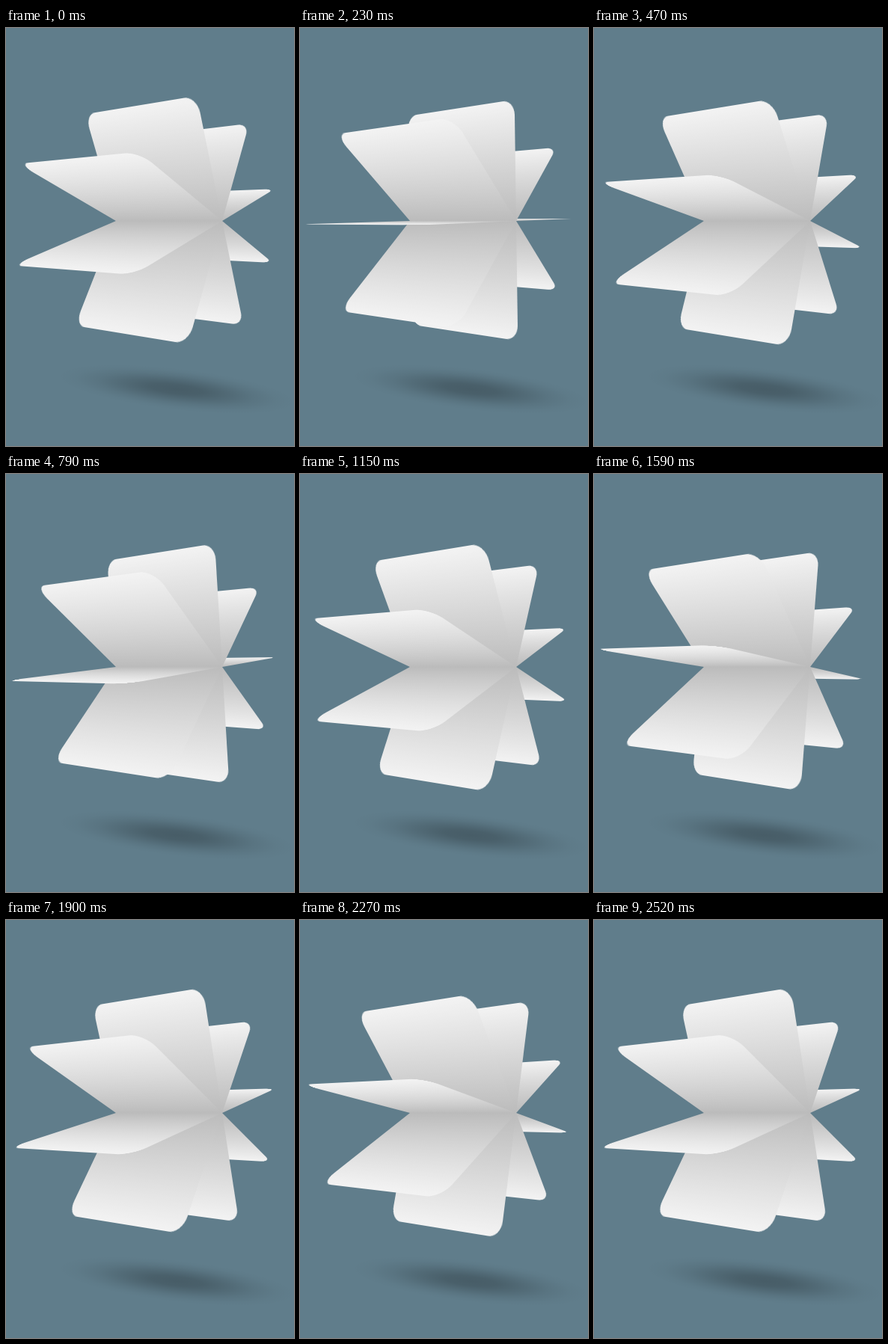
Recreate the animation shown at these times as an HTML page. Size 385 by 559 pixels, loop 2580 ms.

```html
<!DOCTYPE html>
<html lang="en">
<head>
<meta charset="utf-8">
<title>Turning pages</title>
<style>
  html, body { margin: 0; width: 100%; height: 100%; overflow: hidden; background: #607d8b; }
  #stage { position: relative; width: 385px; height: 559px; overflow: hidden; }
  .page {
    position: absolute; left: 147px; top: 258px; width: 200px; height: 160px;
    border-radius: 0 0 20px 20px;
    background: linear-gradient(#bbb, #f3f3f3);
    transform-origin: 0 0;
  }
  .shadow {
    position: absolute; left: 68px; top: 455px; width: 320px; height: 56px;
    transform: rotate(6.5deg);
    background: radial-gradient(closest-side, rgba(0,0,0,.26), rgba(0,0,0,.235) 22%,
      rgba(0,0,0,.16) 42%, rgba(0,0,0,.07) 65%, rgba(0,0,0,.02) 84%, transparent);
  }
</style>
</head>
<body>
<div id="stage"><div class="shadow"></div></div>
<script>
  const LOOP = 2580, STEP_MS = 61.5, LAST_STEP = 41;
  const PAGES = 8, START = 25.6, TURN = 4.5;
  const W = 200, H = 160;
  // Projection of the hinge (AXIS) and of a page's reach sideways and upwards
  const AXIS = 142, REACH = 114, RISE = 139.5;
  const AXIS_DEPTH = 0.135, REACH_DEPTH = 0.235;

  const stage = document.getElementById('stage');
  const pages = Array.from({ length: PAGES }, () => {
    const page = document.createElement('div');
    page.className = 'page';
    return stage.appendChild(page);
  });

  function pose(page, degrees) {
    const angle = degrees * Math.PI / 180;
    const c = Math.cos(angle), s = Math.sin(angle);
    const matrix = [
      AXIS * (1 - AXIS_DEPTH) / W, 0, 0, -AXIS_DEPTH / W,
      -REACH * c / H, -RISE * s / H, 0, -REACH_DEPTH * c / H,
      0, 0, 1, 0,
      0, 0, 0, 1
    ];
    page.style.transform = `matrix3d(${matrix.map(v => v.toFixed(8))})`;
    page.style.zIndex = Math.round(100 + 99 * c);
  }

  function draw(now) {
    const step = Math.min(LAST_STEP, Math.floor((now % LOOP + 23) / STEP_MS));
    pages.forEach((page, i) => pose(page, START + TURN * step + i * 360 / PAGES));
  }

  const begin = performance.now();
  function tick() {
    draw(performance.now() - begin);
    requestAnimationFrame(tick);
  }
  tick();
</script>
</body>
</html>
```
